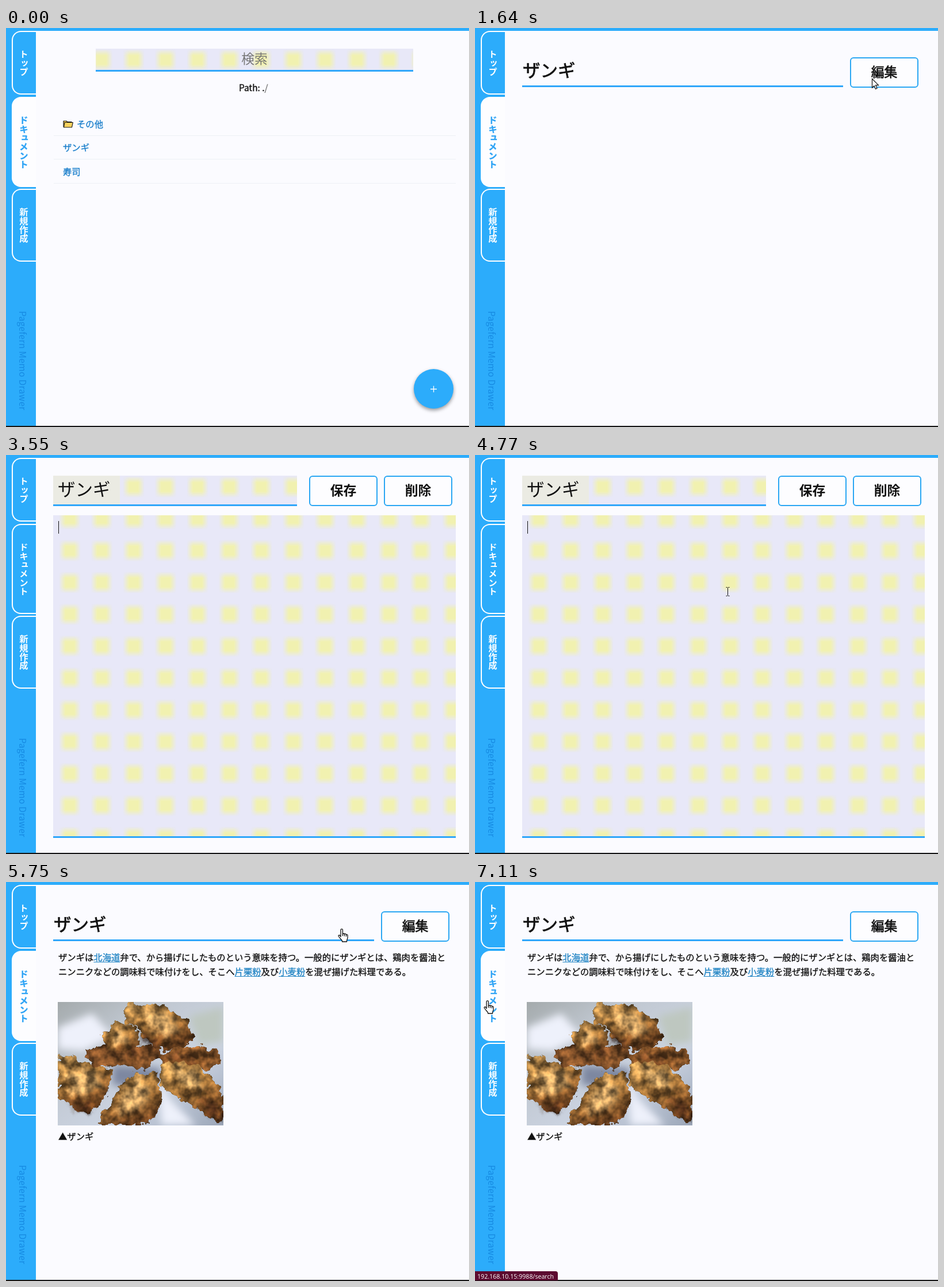
Write an HTML page that moves like this. It is 805 px wide and 695 px high and loops after 7160 ms.

```html
<!DOCTYPE html>
<html lang="ja">
<head>
<meta charset="utf-8">
<title>Wiki demo</title>
<style>
:root { --blue: #2cacfb; --paper: #fbfbff; }
html, body { margin: 0; width: 100%; height: 100%; overflow: hidden; }
#stage {
  position: relative; width: 805px; height: 695px; overflow: hidden;
  background: var(--paper); color: #111;
  font: 400 15.33px/24px "Noto Sans CJK JP", "Noto Sans CJK", sans-serif;
}
#stage * { box-sizing: border-box; }
#stage div, #stage svg { position: absolute; white-space: nowrap; }
#stage [hidden] { display: none; }
.scene { inset: 0; }

#side { left: 0; top: 0; width: 52px; height: 693px; background: var(--blue); }
#bar { left: 0; top: 0; width: 805px; height: 5px; background: var(--blue); }
#edge { left: 0; top: 693px; width: 805px; height: 2px; background: #161616; }
.tab {
  left: 10px; width: 42px; border: 2px solid #fff; border-right: 0;
  border-radius: 16px 0 0 16px; color: #fff; font-weight: 700;
  writing-mode: vertical-rl; line-height: 42px; text-align: center;
}
.tab.on { background: #fdfdff; color: #2ba2f5; }
#brand {
  left: 18px; top: 493px; height: 180px; writing-mode: vertical-rl;
  letter-spacing: .35px; color: #168ae2;
}

/* a medium weight between the regular and bold faces */
.path, .row, .body, .tab.on { -webkit-text-stroke: .35px; }
.heading, #view .button { -webkit-text-stroke: .7px; }

.spots {
  --x: 82px; --y: 36px;
  left: var(--x); top: var(--y); border-bottom: 3px solid #2fa6fa;
  background: #e8e8f8; isolation: isolate;
}
.spots::before {
  --fade: #0000 9px, #000 20px, #000 35.5px, #0000 46.5px;
  --tile: calc(0px - var(--x)) calc(0px - var(--y)) / 55.5px 55.5px;
  content: ""; position: absolute; inset: 0; z-index: -1; background: #f1f1b0;
  transform: translate(0);
  mask: linear-gradient(var(--fade)), linear-gradient(90deg, var(--fade));
  mask-size: 55.5px 55.5px;
  mask-position: calc(27.75px - var(--x)) calc(27.75px - var(--y));
  mask-composite: intersect;
}
.search {
  --x: 156px; width: 552px; height: 40px; text-align: center;
  font-size: 22.8px; line-height: 34px; color: #777;
}
.path { left: 405px; top: 91px; }
.path span { color: #777; }
.row { left: 83px; width: 699px; height: 41px; padding-left: 16px; line-height: 39px; color: #1b7fcb; border-bottom: 1px solid #edf0f5; }
.row.over { --x: 83px; color: #2fa0f2; border: 0; }
.fab {
  left: 709px; top: 594px; width: 69px; height: 69px; border-radius: 50%;
  background: var(--blue); box-shadow: 0 3px 6px #0006;
}

.button {
  width: 119px; height: 53px; border: 2px solid #2ba7f3; border-radius: 6px;
  background: #fdfdff; text-align: center; font-size: 22.8px; font-weight: 700; line-height: 46px;
}
#view .button { font-weight: 400; }
.heading {
  left: 82px; top: 46px; width: 558px; height: 57px; padding-left: 1px;
  border-bottom: 3px solid #2fa6fa; font-size: 30.5px; line-height: 52px;
}
.title { width: 424px; height: 53px; padding-left: 8px; font-size: 30.5px; line-height: 45px; }
.title::after {
  content: ""; position: absolute; left: 0; top: 0; width: 116px; height: 50px;
  background: #ebebe3; z-index: -1;
}
.area { --y: 105px; width: 700px; height: 562px; }
.body { left: 91px; top: 118px; line-height: 25px; }
.body u { color: #2385c4; text-underline-offset: 2px; }
.draft { left: 9px; top: 9px; line-height: 23px; }
#caret { left: 91px; top: 115px; width: 1px; height: 22px; background: #111; }

#status {
  left: 0; top: 678px; height: 16px; width: max-content; padding: 0 7px 0 4px;
  border-radius: 0 4px 0 0; background: #5d0b30; color: #fff;
  font: 10.65px/19px "Open Sans", "Noto Sans", sans-serif;
}
#cursor { left: 0; top: 0; width: 0; height: 0; }
#cursor svg { overflow: visible; width: 20px; height: 26px; }
</style>
</head>
<body>
<div id="stage">
  <div id="side">
    <div class="tab" style="top:5px;height:111px">トップ</div>
    <div class="tab" id="docs" style="top:120px;height:157px">ドキュメント</div>
    <div class="tab" style="top:280px;height:127px">新規作成</div>
    <div id="brand">Pagefern Memo Drawer</div>
  </div>
  <div id="bar"></div>

  <div class="scene" id="list">
    <div class="spots search">検索</div>
    <div class="path">Path: .<span>/</span></div>
    <div class="row" style="top:147px;padding-left:40px">その他
      <svg style="left:16px;top:13px" width="18" height="15" fill="#f7c948" stroke="#1a1a1a" stroke-width="1.2" stroke-linejoin="round">
        <path d="M1 12.500V2h5l1.500 1.500H15V5"/><path d="M1.500 13 3 4.500H17.300L15.500 13z" fill="#fbd35d"/>
      </svg>
    </div>
    <div class="row" style="top:188px">ザンギ</div>
    <div class="row" style="top:230px">寿司</div>
    <div class="fab"><svg width="69" height="69" stroke="#fff" stroke-width="1.300"><path d="M29 35H40M34.500 29.500V40.500"/></svg></div>
  </div>

  <div class="scene" id="view">
    <div class="heading">ザンギ</div>
    <div class="button" style="left:652px;top:51px">編集</div>
    <div class="scene" id="article">
      <div class="body">ザンギは<u>北海道</u>弁で、から揚げにしたものという意味を持つ。一般的にザンギとは、鶏肉を醤油と<br>ニンニクなどの調味料で味付けをし、そこへ<u>片栗粉</u>及び<u>小麦粉</u>を混ぜ揚げた料理である。</div>
      <svg style="left:90px;top:209px" width="288" height="215" viewBox="0 0 288 215">
        <defs>
          <linearGradient id="dish" x2="1" y2="1">
            <stop stop-color="#a4aaac"/><stop offset=".3" stop-color="#c0c7d0"/>
            <stop offset=".65" stop-color="#ccd4e2"/><stop offset="1" stop-color="#9ba6b8"/>
          </linearGradient>
          <linearGradient id="meat" x2=".4" y2="1">
            <stop stop-color="#b58c50"/><stop offset=".5" stop-color="#996c36"/><stop offset="1" stop-color="#683f1e"/>
          </linearGradient>
          <filter id="soft"><feGaussianBlur stdDeviation="5"/></filter>
          <filter id="haze"><feGaussianBlur stdDeviation="7"/></filter>
          <filter id="crust" color-interpolation-filters="sRGB">
            <feTurbulence type="fractalNoise" baseFrequency=".06" numOctaves="3" seed="4" result="noise"/>
            <feDisplacementMap in="SourceGraphic" in2="noise" scale="22" xChannelSelector="R" yChannelSelector="G" result="lump"/>
            <feColorMatrix in="noise" values="2 0 0 0 -.5  2 0 0 0 -.5  2 0 0 0 -.5  0 0 0 0 1"/>
            <feComposite in2="lump" operator="arithmetic" k1="1" k3=".5"/>
          </filter>
        </defs>
        <rect width="288" height="215" fill="url(#dish)"/>
        <g filter="url(#haze)">
          <path d="M0 45 60 20 95 60 45 85 0 82zM175 115 190 165 240 215H180z" fill="#eef1fb"/>
          <path d="M228 25 288 8V70L245 75z" fill="#bec7c0"/>
          <path d="M95 110 180 115 175 150 95 145z" fill="#7d87a0"/>
        </g>
        <g filter="url(#crust)">
          <g fill="url(#meat)">
            <path d="M112 14 130 2 152 6 178 4 205 20 222 28 237 68 215 80 185 82 160 74 140 50 118 38z"/>
            <path d="M82 54 98 32 118 38 138 52 142 70 126 84 118 96 94 94 78 80z"/>
            <path d="M47 84 76 78 110 92 128 74 176 78 178 94 145 118 115 106 88 112 60 116z" fill="#7a4c27"/>
            <path d="M0 92 20 90 40 106 66 112 94 118 96 136 84 162 62 192 36 188 0 168z"/>
            <path d="M170 92 208 78 250 78 280 90 284 108 262 116 222 106 184 108z" fill="#87552a"/>
            <path d="M178 110 208 104 244 108 262 126 284 146 288 196 276 212 252 190 216 168 190 154 174 134z"/>
            <path d="M72 205 98 162 110 140 134 124 164 126 182 148 176 186 168 202 140 215H78z"/>
          </g>
          <g filter="url(#soft)" fill="#cda469" opacity=".75">
            <path d="M150 16 190 20 212 48 188 60 160 42zM92 58 112 50 126 64 104 78zM14 124 52 116 78 138 46 166 20 152zM114 156 144 134 162 154 142 190 104 192zM198 116 236 120 256 150 226 152z"/>
          </g>
          <g filter="url(#soft)" fill="#4a2812" opacity=".65">
            <path d="M142 54 158 64 180 68 172 78 150 74zM16 168 36 174 62 178 58 190 34 186zM246 158 274 178 284 206 264 196zM178 96 216 92 256 106 220 104zM126 82 142 88 130 100z"/>
          </g>
        </g>
      </svg>
      <div class="body" style="top:430px">▲ザンギ</div>
    </div>
  </div>

  <div class="scene" id="edit">
    <div class="spots title">ザンギ</div>
    <div class="button" style="left:527px;top:36px">保存</div>
    <div class="button" style="left:657px;top:36px">削除</div>
    <div class="spots area">
      <div class="draft" id="draft">ザンギは北海道弁で、から揚げにしたものという意味を持つ。一般的にザンギとは、鶏肉を醤油と<br>ニンニクなどの調味料で味付けをし、そこへ片栗粉及び小麦粉を混ぜ揚げた料理である。</div>
    </div>
    <div id="caret"></div>
  </div>

  <div id="edge"></div>
  <div id="status"></div>
  <div id="cursor">
    <svg id="arrow" fill="#fff" stroke="#111" stroke-width="1.200"><path d="M.5.500V16L4 12.700 6.400 18.300 9 17.200 6.600 11.700H11.500z"/></svg>
    <svg id="hand" style="left:-7px;top:-1px" fill="#fff" stroke="#111" stroke-width="1.300" stroke-linejoin="round">
      <path d="M5 14.500V2.600a1.700 1.700 0 0 1 3.400 0V9.600a1.600 1.600 0 0 1 3 .5 1.600 1.600 0 0 1 3 .9 1.500 1.500 0 0 1 2.600 1.200V16c0 2-1.500 3.500-1.500 5.500V23H7.500V21.500C6 19 3.500 17 1.200 13.500c-.8-1.500 1-2.600 2.200-1.500z"/>
      <path d="M8.400 9.600V13M11.400 10.500V13.500M14.400 11.500V14"/>
    </svg>
    <svg id="beam" style="left:-3.500px;top:-8px" fill="none" stroke="#111"><path d="M.5.500H2.500L3.500 1.500 4.500.500H6.500M3.500 1.500V14.500M.5 15.500H2.500L3.500 14.500 4.500 15.500H6.500"/></svg>
  </div>
</div>
<script>
const LOOP = 7160;
const OPEN = 1250, EDIT = 1930, FOCUS = 3310, PASTE = 5000, SAVE = 5680;
const BLINK = 530;

// time, x, y, pointer shape until the next stop
const stops = [
  [0, 452, 700, ""],
  [250, 452, 694, "arrow"],
  [640, 425, 262, "hand"],
  [820, 421, 213, "hand"],
  [OPEN, 421, 213, "arrow"],
  [1650, 690, 88, "hand"],
  [1800, 722, 80, "hand"],
  [EDIT, 724, 82, "arrow"],
  [2100, 734, 92, "arrow"],
  [2350, 690, 110, "beam"],
  [2900, 440, 192, "beam"],
  [3450, 440, 192, ""],
  [4300, 318, 236, "beam"],
  [4770, 439, 238, "beam"],
  [5100, 445, 238, "beam"],
  [5400, 570, 90, "hand"],
  [5520, 584, 66, "hand"],
  [SAVE, 584, 72, "hand"],
  [5750, 584, 82, "hand"],
  [5810, 570, 90, "arrow"],
  [6600, 50, 200, "hand"],
  [6850, 22, 207, "hand"],
  [LOOP, 22, 207, "hand"],
];

const $ = id => document.getElementById(id);
const rows = [...document.querySelectorAll(".row")];
const show = (id, on) => $(id).toggleAttribute("hidden", !on);
const ease = p => p * p * (3 - 2 * p);

function pointer(t) {
  const i = stops.findIndex(s => s[0] > t);
  const [t0, x0, y0, shape] = stops[i - 1], [t1, x1, y1] = stops[i];
  const p = ease((t - t0) / (t1 - t0));
  return { x: x0 + (x1 - x0) * p, y: y0 + (y1 - y0) * p, shape };
}

function draw() {
  const t = performance.now() % LOOP;
  const { x, y, shape } = pointer(t);
  const scene = t < OPEN ? "list" : t >= EDIT && t < SAVE ? "edit" : "view";
  for (const id of ["list", "view", "edit"]) show(id, id === scene);
  for (const id of ["arrow", "hand", "beam"]) show(id, id === shape);
  $("cursor").style.transform = `translate(${Math.round(x)}px, ${Math.round(y)}px)`;

  show("article", t >= SAVE);
  show("draft", t >= PASTE);
  show("caret", t >= FOCUS && t < PASTE && Math.floor((t - FOCUS) / BLINK) % 2 === 0);
  $("docs").classList.toggle("on", scene !== "edit");

  const over = scene === "list" && shape === "hand" ? Math.floor((y - 147) / 41) : -1;
  rows.forEach((row, i) => {
    row.classList.toggle("over", i === over);
    row.classList.toggle("spots", i === over);
    row.style.setProperty("--y", row.style.top);
  });

  const onTab = shape === "hand" && x < 52;
  $("status").textContent = "192.168.10.15:9988/" + (onTab ? "search" : "page?w=.%252F%252F%25E...");
  show("status", over >= 0 || onTab);
  requestAnimationFrame(draw);
}
draw();
</script>
</body>
</html>
```
